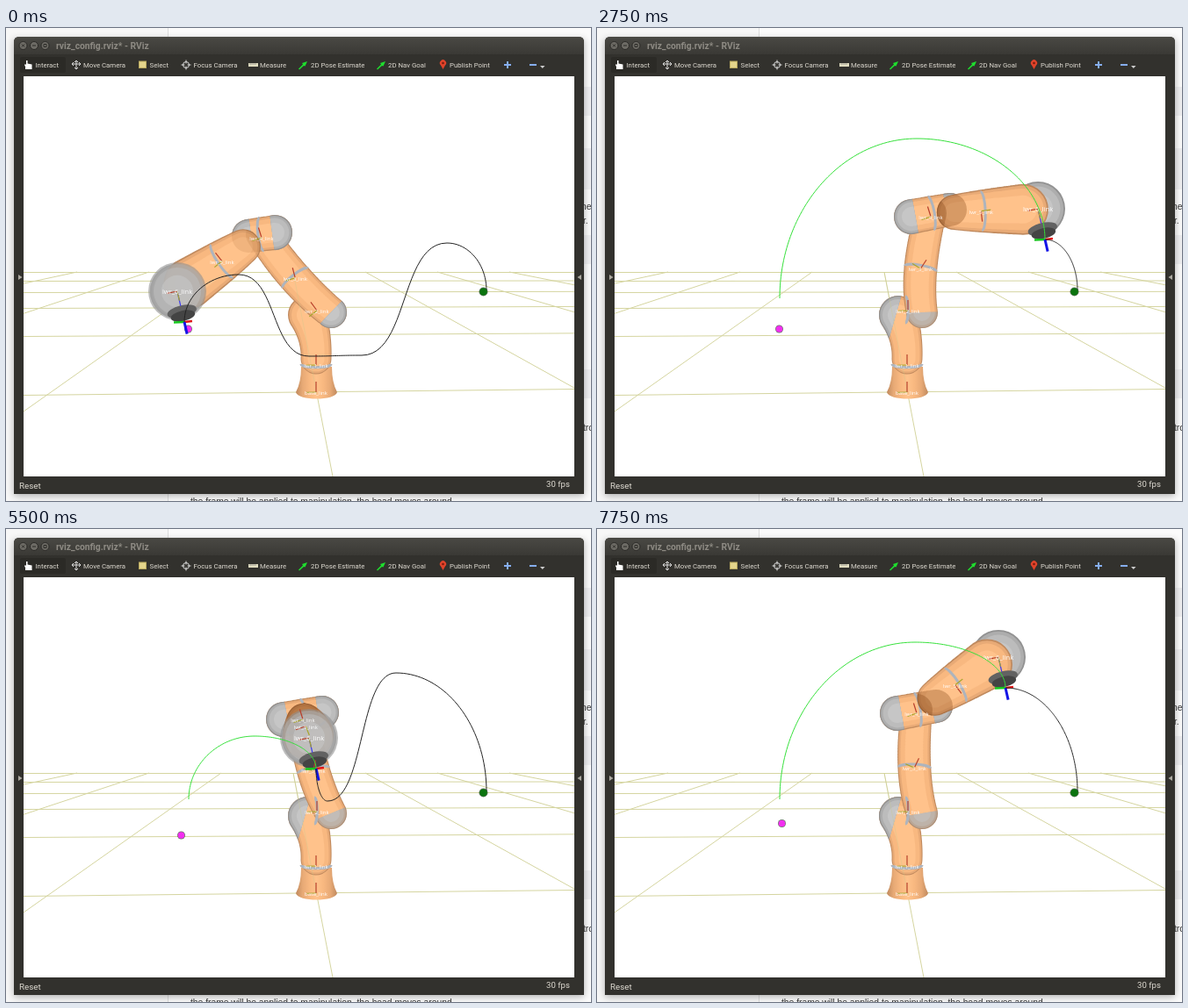
Write an HTML page with a canvas that moves like this. It is 666 by 539 pixels and loops after 8 s.

```html
<!DOCTYPE html>
<html lang="en">
<head>
<meta charset="utf-8">
<title>Robot arm</title>
<style>
html, body { margin: 0; width: 666px; height: 539px; overflow: hidden; background: #f7f7f7; }
svg, canvas { position: absolute; left: 0; top: 0; width: 666px; height: 539px; }
text { font-family: Roboto, "Open Sans", sans-serif; fill: #dfdbd2; }
.tool text { font-size: 7.8px; }
.page text { font: 10.3px "Liberation Sans", Arial, sans-serif; fill: #333; }
</style>
</head>
<body>
<svg viewBox="0 0 666 539">
  <defs>
    <linearGradient id="bar" x2="0" y2="1"><stop stop-color="#4a4944"/><stop offset="1" stop-color="#3a3935"/></linearGradient>
    <clipPath id="view"><rect x="20" y="55" width="627" height="456"/></clipPath>
    <filter id="soft" x="-5%" y="-5%" width="110%" height="110%"><feGaussianBlur stdDeviation="4"/></filter>
  </defs>
  <g class="page">
    <path d="M185 0H666V539H185Z" fill="#fbfbfb"/>
    <path d="M184.500 0V539" stroke="#ddd"/>
    <path d="M656 67h10v33h-10zM656 137h10v47h-10zM656 236h10v33h-10zM656 389h10v33h-10z" fill="#efeff1"/>
    <rect x="9" y="13" width="649" height="520" fill="#000" opacity=".3" filter="url(#soft)"/>
    <text x="655" y="207">ne</text><text x="657" y="223">r.</text><text x="657" y="459">tro</text>
    <text x="210" y="543">the frame will be applied to manipulation, the head moves around</text>
  </g>
  <path d="M9 531V16q0-6 6-6H652q6 0 6 6V531Z" fill="#32312d"/>
  <path d="M9 30V16q0-6 6-6H652q6 0 6 6V30Z" fill="url(#bar)"/>
  <g fill="#6d6b65" stroke="#2b2a27">
    <circle cx="19.500" cy="20" r="4.500"/><circle cx="32" cy="20" r="4.500"/><circle cx="44.500" cy="20" r="4.500"/>
    <path d="M18 18.500l3 3m0-3l-3 3M30 20h4M43 18.500h3v3h-3z" fill="none"/>
  </g>
  <text x="57" y="23.500" font-size="10.300" font-weight="700" style="fill:#8d8a83">rviz_config.rviz* - RViz</text>
  <g class="tool">
    <rect x="16" y="33" width="52" height="18" rx="2" fill="#2b2a26"/>
    <path d="M22 47v-3l-1-2 1-1 1 1v-5h1.500v3.500l5 1V47z" fill="#fff"/>
    <path d="M80 37v10M75 41h10M78 39l2-2 2 2M77 39l-2 2 2 2M83 39l2 2-2 2M78 45l2 2 2-2" fill="none" stroke="#ddd"/>
    <rect x="151.500" y="38" width="8" height="7.500" fill="#e4d58c" stroke="#b9a95e"/>
    <circle cx="205" cy="42" r="3.500" fill="none" stroke="#ddd"/>
    <path d="M205 36.500v4m0 3v4M199.500 42h4m3 0h4" stroke="#ddd"/>
    <rect x="276" y="40" width="11" height="4" fill="#e0dcc0"/><path d="M278 40v2m2-2v2m2-2v2m2-2v2" stroke="#777" stroke-width=".6"/>
    <path id="arrow" d="M333 46.500l5-5-1-1.500 6-2-2.500 5.500-1.500-.5-5 4.500z" fill="#1fdc2e"/>
    <use href="#arrow" x="89"/>
    <path d="M497.500 47l-2.500-4.500a3.600 3.600 0 1 1 5 0z" fill="#e0432a"/><circle cx="497.500" cy="40" r="1.300" fill="#7a1c10"/>
    <path d="M567 42h8m-4-4v8M596 42h8" stroke="#86aef0" stroke-width="2"/>
    <path d="M608 43h5.500l-2.700 3z" fill="#ccc"/>
    <text x="33.500" y="45">Interact</text><text x="88" y="45">Move Camera</text><text x="163.500" y="45">Select</text>
    <text x="213.500" y="45">Focus Camera</text><text x="289" y="45">Measure</text><text x="347" y="45">2D Pose Estimate</text>
    <text x="435" y="45">2D Nav Goal</text><text x="505" y="45">Publish Point</text>
  </g>
  <path d="M14 281l4.500 3-4.500 3zM655 281l-4.500 3 4.500 3z" fill="#aaa79f"/>
  <text x="15" y="525" font-size="9.800">Reset</text><text x="615" y="522.500" font-size="9.600">30 fps</text>
  <rect x="20" y="55" width="627" height="456" fill="#fff"/>
  <g id="grid" clip-path="url(#view)" stroke="#d5d5a0" fill="none"/>
</svg>
<canvas id="scene" width="666" height="539"></canvas>
<script>
const ctx = document.getElementById('scene').getContext('2d');
const ORANGE = ['#c08a5e', '#e8aa76', '#f8b880', '#ffc28b'];
const GRAY = ['#929292', '#adadad', '#bcbcbc', '#c6c6c6'];

// Ground plane: lines converge on one vanishing point, rows recede from the base.
let grid = '';
for (const y of [278, 288, 301, 319, 351, 418]) grid += `M20 ${y + .5}L647 ${y + .5 - (y - 278) * .05}`;
for (let k = -4; k <= 4; k++) grid += `M${327 + 82 * k} 278l${(.193 + 1.608 * k) * 233} 233`;
document.getElementById('grid').innerHTML = `<path d="${grid}"/>`;

const mix = (a, b, u) => a + (b - a) * u;
const mixAll = (a, b, u) => a.map((v, i) => mix(v, b[i], u));
const add = ([x, y], dx, dy) => [x + dx, y + dy];
const clamp = u => Math.max(0, Math.min(1, u));
const heading = (a, b) => Math.atan2(b[1] - a[1], b[0] - a[0]);

// Smooth path that runs level through its peaks and upright at its ends.
function path(nodes) {
  const n = nodes.length - 1, out = [];
  const level = i => i < n && (i > 0 || n === 1);
  const handle = (i, j) => {
    const [x, y] = nodes[i], [p, q] = nodes[j];
    return level(i) ? [mix(x, p, .55), y] : [x, mix(y, q, .55)];
  };
  for (let i = 0; i <= 120; i++) {
    const s = i / 120 * n, k = Math.min(Math.floor(s), n - 1), u = s - k, v = 1 - u;
    const c = [nodes[k], handle(k, k + 1), handle(k + 1, k), nodes[k + 1]];
    const w = [v * v * v, 3 * v * v * u, 3 * v * u * u, u * u * u];
    out.push([0, 1].map(d => c.reduce((sum, p, m) => sum + p[d] * w[m], 0)));
  }
  return out;
}

// A pose is its elbow and wrist, the top of the trail and the turns still ahead.
const flange = wrist => add(wrist, 8, 35);
function pose(elbow, wrist, top, ...ahead) {
  const tip = flange(wrist);
  return {
    elbow, wrist,
    done: path(top ? [[208, 308], top, tip] : [tip, tip]),
    plan: path([tip, ...ahead, [547, 299]])
  };
}
const start = pose([291, 235], [195, 300], null, [265, 281], [345, 374], [405, 373], [502, 245]);
const leave = pose([284, 248], [180, 284], null, [250, 256], [345, 370], [405, 370], [496, 235]);
const middle = pose([338, 213], [345, 238], [283, 236], [366, 310], [444, 164]);
const lower = pose([358, 233], [421, 339], [302, 213], [434, 376], [492, 229]);
const right = pose([354, 214], [415, 248], [304, 201], [465, 190]);
const reach = pose([380, 211], [502, 206], [364, 126]);
const goal = pose([395, 232], [533, 262], [364, 126]);
const high = pose([364, 206], [457, 146], [362, 129]);
const keys = [[0, start], [1250, middle], [1750, lower], [2750, reach], [3500, goal],
  [3750, start], [4250, leave], [5500, middle], [6500, right], [7750, high]];

// Outline of a chain of discs [x, y, r], smoothed through its corners.
function hull(chain, scale = 1) {
  const shape = new Path2D(), n = chain.length - 1;
  for (let i = 0; i <= 40; i++) {
    const u = i / 40;
    const a = mixAll(chain[0], chain[n >> 1], u), b = mixAll(chain[n >> 1], chain[n], u);
    let [x, y, r] = n < 2 ? mixAll(chain[0], chain[n], u) : mixAll(a, b, u);
    // Lift the curve so that it meets the middle disc.
    if (n === 2) {
      const bend = 2 * u * (1 - u), [p, q, s] = chain.map((c, k) => c);
      x += bend * (q[0] - (p[0] + s[0]) / 2);
      y += bend * (q[1] - (p[1] + s[1]) / 2);
    }
    shape.moveTo(x + r * scale, y);
    shape.arc(x, y, r * scale, 0, 7);
  }
  return shape;
}
function tube(chain, tones, alpha = 1) {
  ctx.globalAlpha = alpha;
  [1, .94, .82, .55].forEach((s, i) => { ctx.fillStyle = tones[i]; ctx.fill(hull(chain, s)); });
  ctx.globalAlpha = 1;
}
// Draws only the side of p that lies behind direction a.
function behind([x, y], a, draw) {
  ctx.save();
  ctx.translate(x, y); ctx.rotate(a);
  ctx.beginPath(); ctx.rect(-80, -80, 80, 160); ctx.clip();
  ctx.rotate(-a); ctx.translate(-x, -y);
  draw();
  ctx.restore();
}
function ring([x, y], a, r) {
  ctx.strokeStyle = '#aeb4bd'; ctx.lineWidth = 3;
  ctx.beginPath(); ctx.ellipse(x, y, r * .22, r, a, -Math.PI / 2, Math.PI / 2); ctx.stroke();
}
function disc([x, y], rx, ry, a, color) {
  ctx.fillStyle = color;
  ctx.beginPath(); ctx.ellipse(x, y, rx, ry, a, 0, 7); ctx.fill();
}
function line(p, color, width) {
  ctx.strokeStyle = color; ctx.lineWidth = width;
  ctx.beginPath(); p.forEach(([x, y]) => ctx.lineTo(x, y)); ctx.stroke();
}
const ray = (p, a, len, color, w) =>
  line([p, add(p, Math.cos(a) * len, Math.sin(a) * len)], color, w);

function tag(p, name, a, size = 6) {
  ray(p, a, 12, '#b8402c', 1.2);
  ray(p, a - 1.6, 11, '#a8a52c', 1.2);
  ctx.fillStyle = '#fff'; ctx.font = `${size}px "Open Sans", sans-serif`; ctx.textAlign = 'center';
  ctx.fillText(name, p[0], p[1] + 3);
}

function base() {
  const g = ctx.createLinearGradient(330, 0, 377, 0);
  [0, 1, 2, 3, 2, 1, 0].forEach((tone, i) => g.addColorStop(i / 6, ORANGE[tone]));
  ctx.fillStyle = g;
  ctx.beginPath();
  ctx.moveTo(336, 386);
  ctx.quadraticCurveTo(336, 404, 330, 415);
  ctx.bezierCurveTo(332, 425, 375, 425, 377, 415);
  ctx.quadraticCurveTo(371, 404, 371, 386);
  ctx.fill();
}

function arm(elbow, wrist) {
  const turn = clamp((wrist[0] - 200) / 130);          // swing of the arm about its base
  const cover = .6 * clamp((450 - wrist[0]) / 30);     // wrist in front of the forearm
  const tip = flange(wrist), up = -Math.PI / 2;
  const shoulder = [370, 324];
  const bend = add(mixAll(shoulder, elbow, .44), -6, 0);
  const hip = add(elbow, mix(15, -22, turn), mix(-2, 4, turn));
  const far = mixAll(hip, elbow, 2);
  const mid = mixAll(elbow, wrist, .47);
  const axis = heading(hip, far), reachDir = heading(elbow, wrist), hang = heading(wrist, tip);

  const low = [[353, 377, 17.5], [351, 352, 17.5], [343, 327, 22]];
  const upper = [[...shoulder, 18], [...bend, 20], [...elbow, 18]];
  const bar = [[...hip, 20], [...far, 19]];
  const fore = [[...mixAll(elbow, wrist, .22), 20], [...mid, 24], [...mixAll(elbow, wrist, .86), 29]];

  base();
  tube(low, ORANGE);
  ring([353, 383], Math.PI / 2, 17);
  if (turn > 0) behind([341, 324], .28, () => tube(low, GRAY, turn));

  tube(upper, ORANGE);
  behind(shoulder, heading(shoulder, bend), () => tube([[...shoulder, 18]], GRAY, mix(1, .45, turn)));
  ring(bend, heading(bend, elbow), 18);
  ctx.globalAlpha = turn; ring([351, 321], 0, 15); ctx.globalAlpha = 1;

  tube(bar, ORANGE);
  behind(mixAll(hip, far, .1), axis, () => tube(bar, GRAY));
  behind(mixAll(hip, far, .9), axis + Math.PI, () => tube(bar, GRAY));
  ring(mixAll(hip, far, .5), axis, 19);

  tube([[...wrist, 31]], GRAY);
  tube(fore, ORANGE);
  ring(mid, reachDir, 22);
  // Overlapping shells show through each other as a darker tone.
  ctx.fillStyle = '#7a3d10';
  for (const shell of [upper, bar]) {
    ctx.save();
    ctx.clip(hull(shell));
    ctx.globalAlpha = mix(.1, .3, turn);
    ctx.fill(hull(fore));
    ctx.restore();
  }
  if (cover > 0) tube([[...wrist, 33]], GRAY, cover);

  disc(mixAll(wrist, tip, .66), 17, 7, hang + up, '#626262');
  disc(mixAll(wrist, tip, .8), 14, 6, hang + up, '#444');

  ctx.globalAlpha = .35;
  line([[327, 278], [354, 418]], '#c9c98c', 1);
  ctx.globalAlpha = 1;
  tag([353, 415], 'base_link', up);
  tag([353, 384], 'lwr_1_link', up);
  tag([354, 322], 'lwr_2_link', mix(-2.2, up, turn));
  tag(bend, 'lwr_3_link', heading(bend, elbow) + .4);
  tag(add(elbow, 0, 4), 'lwr_4_link', up - .3);
  tag(mid, 'lwr_5_link', reachDir + 1.5);
  ray(wrist, hang, 17, '#3a3af0', 1.2);
  tag(wrist, 'lwr_6_link', hang + 1.6, 7.5);
  ray(tip, hang + 1.75, 12, '#16c81e', 2.5);
  ray(tip, hang - 1.45, 9, '#e01818', 2.5);
  ray(tip, hang, 14, '#1414e6', 3);
}

function ball(x, y, r, color) {
  disc([x, y], r, r, 0, 'rgba(0,30,0,.6)');
  disc([x, y], r - .7, r - .7, 0, color);
}

function draw(t) {
  const k = keys.findLastIndex(([at]) => at <= t);
  const [t0, from] = keys[k], [t1, to] = keys[k + 1] || [8000, from];
  const u = (t - t0) / (t1 - t0);
  const trail = name => from[name].map((p, i) => mixAll(p, to[name][i], u));

  ctx.clearRect(0, 0, 666, 539);
  ctx.save();
  ctx.beginPath(); ctx.rect(20, 55, 627, 456); ctx.clip();
  const home = t < 3750 ? [207.5, 343] : t < 7000 ? [199.5, 349] : [210.5, 335.5];
  ball(...home, 4.5, '#f22ff0');
  arm(mixAll(from.elbow, to.elbow, u), mixAll(from.wrist, to.wrist, u));
  line(trail('done'), '#35e03a', 1);
  line(trail('plan'), '#222', 1);
  ball(543.5, 300.5, 5, '#0b730f');
  ctx.restore();
}

// The picture advances four times a second.
let shown = -1;
function tick() {
  const t = Math.floor(performance.now() % 8000 / 250) * 250;
  if (t !== shown) draw(shown = t);
  requestAnimationFrame(tick);
}
tick();
</script>
</body>
</html>
```
